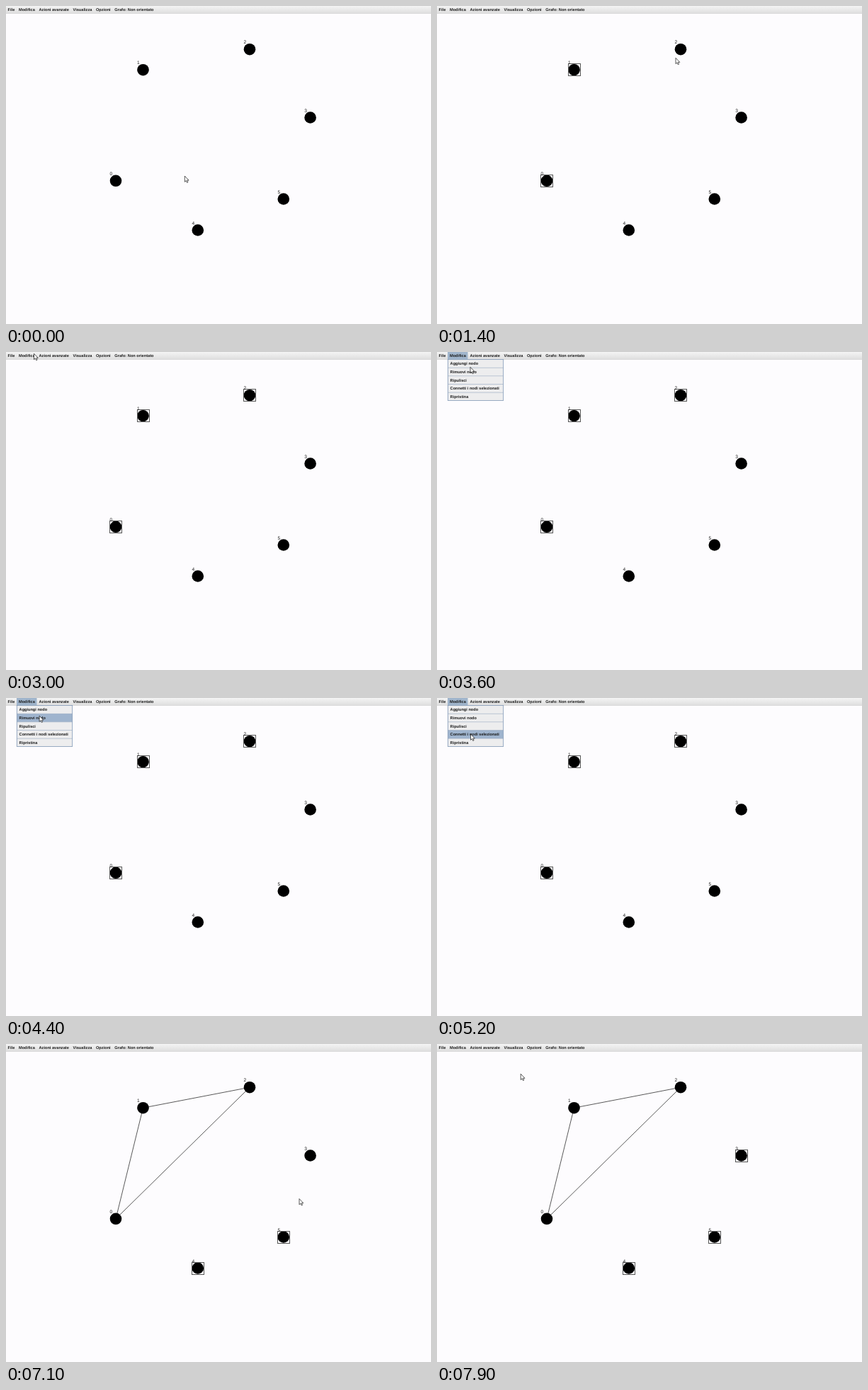
Animation, 600 px wide and 449 px high, one loop 8000 ms. Source, as an HTML page:

```html
<!DOCTYPE html>
<html lang="it">
<head>
<meta charset="utf-8">
<style>
html, body { margin: 0; width: 100%; height: 100%; overflow: hidden; background: #fdfcfe; }
svg { display: block; width: 600px; height: 449px; }
text { font: bold 5.6px "Liberation Sans", Arial, sans-serif; fill: #1c1c1c; text-rendering: geometricPrecision; }
.label { font-weight: normal; font-size: 6.6px; }
.box { fill: none; stroke: #555; shape-rendering: crispEdges; }
.edge { stroke: #222; stroke-width: .75; }
</style>
</head>
<body>
<svg viewBox="0 0 600 449">
  <defs>
    <linearGradient id="shade" x2="0" y2="1">
      <stop stop-color="#f4f4f4"/><stop offset="1" stop-color="#dedede"/>
    </linearGradient>
  </defs>
  <g id="edges"></g>
  <g id="nodes"></g>
  <rect width="600" height="10.5" fill="url(#shade)"/>
  <rect y="10" width="600" height=".6" fill="#cfcfcf"/>
  <rect id="active" x="15" width="28.5" height="10.5" fill="#a0b5cc"/>
  <text id="bar" x="2.6" y="7" style="font-size:5.65px"></text>
  <g id="menu">
    <rect x="15.3" y="10.5" width="78.4" height="58" fill="#ededee"/>
    <rect id="hover" x="15.5" width="78" height="11.6" fill="#9fb4ce"/>
    <g id="items"></g>
    <rect x="15.3" y="10.5" width="78.4" height="58" fill="none" stroke="#8198b5" stroke-width=".8"/>
  </g>
  <path id="cursor" d="M0 0V8.3L1.9 6.6L3.2 9.4L4.6 8.8L3.3 6.1H5.8Z" fill="#fff" stroke="#222" stroke-width=".75"/>
</svg>
<script>
const LOOP = 8000, STEP = 100, ROW = 11.65, TOP = 10.5;
const PAUSE = 200, TRAVEL = 900;   // rest before each click, longest move
const OPEN = 3200, CONNECT = 5300;
const $ = id => document.getElementById(id);
const show = (el, on) => el.setAttribute('visibility', on ? 'visible' : 'hidden');

const nodes = [[155, 246.8], [193.5, 90.2], [344, 61.2], [429.6, 157.5], [270.8, 316.5], [391.8, 272.5]];
const bar = ['File', 'Modifica', 'Azioni avanzate', 'Visualizza', 'Opzioni', 'Grafo: Non orientato'];
const items = ['Aggiungi nodo', 'Rimuovi nodo', 'Ripulisci', 'Connetti i nodi selezionati', 'Ripristina'];

// pointer stops: arrival time, x, y
const stops = [
  [0, 252.3, 240], [400, 159, 250], [900, 194, 92], [1400, 337, 73.3], [1700, 347, 65],
  [3000, 39.5, 2.3], [3600, 47, 21.3], [5100, 47.5, 51],
  [6300, 271.8, 309.8], [6700, 391, 271], [7300, 437, 166], [7900, 118.2, 42.2]
];

// a node is selected by the click after the pointer stops on it
const picked = nodes.map(([x, y]) =>
  stops.find(s => Math.hypot(s[1] - x, s[2] - y) < 12)[0] + PAUSE);
const linked = nodes.filter((n, i) => picked[i] < CONNECT);

$('edges').innerHTML = linked.map(([x, y], i) => {
  const [x2, y2] = linked[(i + 1) % linked.length];
  return `<line class="edge" x1="${x}" y1="${y}" x2="${x2}" y2="${y2}"/>`;
}).join('');
const snap = v => Math.floor(v - 8.4) + .5;
$('nodes').innerHTML = nodes.map(([x, y], i) =>
  `<circle cx="${x}" cy="${y}" r="8.3"/>
   <rect class="box" x="${snap(x)}" y="${snap(y)}" width="17" height="17"/>
   <text class="label" x="${x - 8.4}" y="${y - 7.8}">${i}</text>`).join('');
$('bar').innerHTML = bar.map((s, i) => `<tspan dx="${i ? 5.65 : 0}">${s}</tspan>`).join('');
$('items').innerHTML = items.map((s, i) =>
  `<text x="18.6" y="${18.2 + i * ROW}">${s}</text>` +
  (i ? `<rect x="15.5" y="${TOP + i * ROW - .3}" width="78" height=".7" fill="#a3b3c8"/>` : '')).join('');
const boxes = document.querySelectorAll('.box');

function pointer(t) {
  const next = stops.findIndex(s => s[0] > t);
  if (next < 0) return stops.at(-1).slice(1);
  const [t0, x0, y0] = stops[next - 1], [t1, x1, y1] = stops[next];
  const leave = t0 && Math.max(t0 + PAUSE, t1 - TRAVEL);
  const u = Math.max(0, (t - leave) / (t1 - leave)), e = u * u * (3 - 2 * u);
  return [x0 + (x1 - x0) * e, y0 + (y1 - y0) * e];
}

function draw(t) {
  const [x, y] = pointer(t), open = t >= OPEN && t < CONNECT;
  const row = Math.max(0, Math.floor((y - TOP) / ROW));
  $('cursor').setAttribute('transform', `translate(${x} ${y})`);
  boxes.forEach((box, i) => show(box, t >= picked[i] && (t < CONNECT || picked[i] > CONNECT)));
  show($('edges'), t >= CONNECT);
  show($('active'), open);
  show($('menu'), open);
  show($('hover'), open && t > 3600);
  $('hover').setAttribute('y', TOP + row * ROW);
}

const start = performance.now();
function frame() {
  const t = (performance.now() - start) % LOOP;
  draw(Math.floor(t / STEP) * STEP);
  requestAnimationFrame(frame);
}
frame();
</script>
</body>
</html>
```
